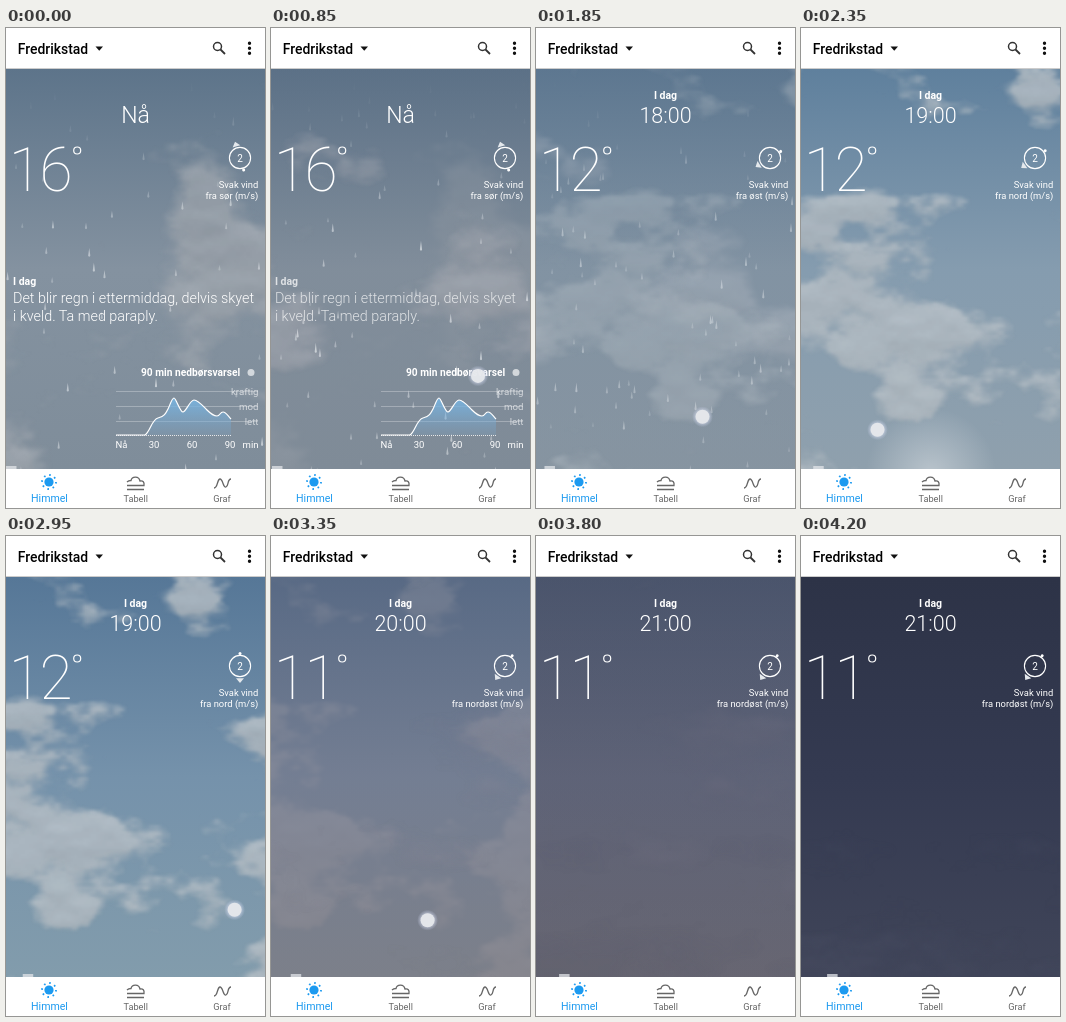
Write an HTML page with a canvas that moves like this. It is 259 px wide and 480 px high and loops after 5200 ms.

```html
<!DOCTYPE html>
<html lang="no">
<head>
<meta charset="utf-8">
<title>Værmelding</title>
<style>
  html, body { margin: 0; width: 100%; height: 100%; overflow: hidden; background: #fff; }
  canvas, svg { position: absolute; left: 0; top: 0; width: 259px; height: 480px; }
  svg { font-family: Roboto, sans-serif; fill: #fff; }
  .mid { text-anchor: middle; }
  .end { text-anchor: end; }
  .thin { font-weight: 100; }
  .light { font-weight: 300; }
  .bold { font-weight: 700; }
  .line { fill: none; stroke: #fff; }
</style>
</head>
<body>
<canvas id="sky" width="259" height="480"></canvas>
<svg viewBox="0 0 259 480">
  <defs>
    <linearGradient id="water" x1="0" y1="0" x2="0" y2="1">
      <stop offset="0" stop-color="#78b4e0" stop-opacity=".95"/>
      <stop offset="1" stop-color="#78a8d0" stop-opacity=".2"/>
    </linearGradient>
    <radialGradient id="halo">
      <stop offset=".6" stop-color="#dfe4f4" stop-opacity=".6"/>
      <stop offset="1" stop-color="#c3cbe8" stop-opacity="0"/>
    </radialGradient>
  </defs>

  <text id="day" class="mid bold" x="129.5" y="71" font-size="10.5">I dag</text>
  <text id="hour" class="mid light" x="129.5" y="94.5"></text>
  <text id="temp" class="thin" x="2.8" y="163" font-size="60.5" letter-spacing="-2.5"></text>
  <circle class="line" cx="71.2" cy="122.5" r="3.5" stroke-width="1.2"/>

  <g font-size="9.4">
    <circle class="line" cx="234" cy="130" r="10.6" stroke-width="1.1"/>
    <text id="speed" class="mid" x="234" y="133.6" font-size="10"></text>
    <g id="vane">
      <path d="M12.2 -4L17 0L12.2 4Z" fill="#e4e8ec"/>
      <circle cx="-12.5" r="1.5"/>
    </g>
    <text class="end" x="252.3" y="159.6">Svak vind</text>
    <text id="from" class="end" x="252.3" y="170.6"></text>
  </g>

  <g id="story">
    <text class="bold" x="7" y="256.5" font-size="10.5">I dag</text>
    <g class="light" font-size="14.35">
      <text x="7" y="274.5">Det blir regn i ettermiddag, delvis skyet</text>
      <text x="7" y="293">i kveld. Ta med paraply.</text>
    </g>
  </g>

  <g id="chart">
    <text class="bold" x="135" y="348" font-size="10.2">90 min nedbørsvarsel</text>
    <circle cx="245" cy="344.5" r="3.5" fill-opacity=".65"/>
    <path d="M110 363.5H252M110 378.5H252M110 393.5H252" class="line" stroke-opacity=".28"/>
    <path d="M110 407.5H225" class="line" stroke-opacity=".8" stroke-dasharray="1 1"/>
    <path id="fill" fill="url(#water)"/>
    <path id="curve" class="line" stroke-width="1.2"/>
    <g font-size="9.7" class="end" fill-opacity=".65">
      <text x="252.5" y="367">kraftig</text>
      <text x="252.5" y="382">mod</text>
      <text x="252.5" y="397">lett</text>
    </g>
    <g font-size="9.5" class="mid">
      <text x="115.5" y="420">Nå</text>
      <text x="148" y="420">30</text>
      <text x="186" y="420">60</text>
      <text x="224" y="420">90</text>
      <text x="244.5" y="420">min</text>
    </g>
  </g>

  <rect id="bar" y="438" width="10.5" height="3.5" fill="#e2e5e8" fill-opacity=".75"/>
  <g id="touch">
    <circle r="10.5" fill="url(#halo)"/>
    <circle r="7" fill="#e6e8ec" fill-opacity=".93"/>
  </g>

  <rect width="259" height="41"/>
  <path d="M0 40.5H259" stroke="#000" stroke-opacity=".2"/>
  <g>
    <text x="11.8" y="25.5" font-size="13.9" font-weight="500" fill="#000">Fredrikstad</text>
    <path d="M89.5 18.500H97L93.25 22.7Z" fill="#111"/>
    <circle cx="211.5" cy="18.5" r="4" fill="none" stroke="#333" stroke-width="1.5"/>
    <path d="M214.5 21.5L219 26" stroke="#333" stroke-width="1.8"/>
    <path d="M243.5 15.3v.01m0 5v.01m0 5v.01" stroke="#111" stroke-width="3.4" stroke-linecap="round"/>
  </g>

  <rect y="441" width="259" height="39"/>
  <g class="mid" font-size="9.2" fill="#666">
    <g fill="#1c9af0">
      <circle cx="43" cy="454" r="4.6"/>
      <circle cx="43" cy="454" r="7" fill="none" stroke="#1c9af0" stroke-width="1.8" stroke-dasharray="1.6 3.898"/>
      <text x="43.5" y="474" font-size="10.6">Himmel</text>
    </g>
    <path d="M121 461.5H138M121 457.500H138C138.500 454 137 452.500 134 453C133 448 126 448 125 452.500C123 452.500 122 453 121 454" fill="none" stroke="#666" stroke-width="1.3"/>
    <text x="129.7" y="474">Tabell</text>
    <path d="M208 460C212 460 211 451 214 451S217 460 220 459S221 451 225 451" fill="none" stroke="#666" stroke-width="1.3"/>
    <text x="216" y="474">Graf</text>
  </g>
</svg>
<script>
const $ = id => document.getElementById(id);
const set = (id, attrs) => Object.entries(attrs).forEach(([k, v]) => $(id).setAttribute(k, v));
const W = 259, TOP = 41, H = 400, PAD = 100, LOOP = 5200;
const ctx = $('sky').getContext('2d');
const clamp = (v, lo = 0, hi = 1) => Math.max(lo, Math.min(hi, v));
const mix = (a, b, u) => a + (b - a) * u;
const smooth = (a, b, v) => { v = clamp((v - a) / (b - a)); return v * v * (3 - 2 * v); };

function hash(x, y) {
  let n = Math.imul(x, 374761393) + Math.imul(y, 668265263);
  n = Math.imul(n ^ (n >>> 13), 1274126177);
  return ((n ^ (n >>> 16)) >>> 0) / 4294967296;
}

function noise(x, y) {
  const i = Math.floor(x), j = Math.floor(y);
  const u = smooth(0, 1, x - i), v = smooth(0, 1, y - j);
  return mix(mix(hash(i, j), hash(i + 1, j), u), mix(hash(i, j + 1), hash(i + 1, j + 1), u), v);
}

function fbm(x, y) {
  let sum = 0, amp = .5;
  for (let k = 0; k < 5; k++, amp /= 2, x *= 2.03, y *= 2.03) sum += amp * noise(x, y);
  return sum;
}

// A band of clouds around height cy, lit from above.
function clouds({ seed, rgb, alpha, cy, spread, edge }) {
  const c = document.createElement('canvas');
  c.width = (W + 2 * PAD) >> 1;
  c.height = H >> 1;
  const g = c.getContext('2d'), img = g.createImageData(c.width, c.height);
  for (let py = 0, k = 0; py < c.height; py++) {
    const y = py * 2 + TOP;
    const band = Math.exp(-(((y - cy) / spread) ** 2));
    for (let px = 0; px < c.width; px++, k += 4) {
      const u = px / 50 + seed, v = y / 62 + seed;
      const n = fbm(u, v);
      const light = (n - fbm(u, v - .15)) * 70;
      rgb.forEach((base, q) => img.data[k + q] = base + light);
      img.data[k + 3] = 255 * alpha * smooth(0, edge, n + .27 * band - .64);
    }
  }
  g.putImageData(img, 0, 0);
  return c;
}

const rain = clouds({ seed: 3, rgb: [160, 166, 173], alpha: .7, cy: 270, spread: 120, edge: .2 });
const storm = clouds({ seed: 8, rgb: [164, 167, 175], alpha: .8, cy: 285, spread: 95, edge: .2 });
const fair = clouds({ seed: 13, rgb: [175, 184, 191], alpha: .85, cy: 270, spread: 85, edge: .12 });
const dusk = clouds({ seed: 21, rgb: [135, 130, 144], alpha: .25, cy: 300, spread: 110, edge: .3 });
const night = clouds({ seed: 27, rgb: [68, 73, 94], alpha: .3, cy: 400, spread: 90, edge: .3 });

function scene(at, colors, layer) {
  const sky = ctx.createLinearGradient(0, TOP, 0, TOP + H);
  colors.forEach((c, i) => sky.addColorStop(i / 2, c));
  return { at, sky, layer };
}

const scenes = [
  scene(0, ['#5d748a', '#8492a0', '#7f8d9a'], rain),
  scene(1400, ['#5b6f85', '#7f8b98', '#7f8a96'], storm),
  scene(2350, ['#5f809d', '#859caf', '#8fa0ad'], fair),
  scene(2950, ['#567797', '#7592ab', '#829cac'], fair),
  scene(3550, ['#59657e', '#73778a', '#7a767e'], dusk),
  scene(4200, ['#2d3347', '#343a51', '#404559'], night)
];

function drawScene(s, t, alpha) {
  ctx.globalAlpha = alpha;
  ctx.fillStyle = s.sky;
  ctx.fillRect(0, TOP, W, H);
  const drift = clamp((2600 - t) * .08, -PAD, PAD);
  ctx.drawImage(s.layer, drift - PAD, TOP, W + 2 * PAD, H);
}

const glow = ctx.createRadialGradient(130, 445, 4, 130, 445, 65);
glow.addColorStop(0, '#fff');
glow.addColorStop(1, '#fff0');

function drawSky(t) {
  const next = Math.max(1, scenes.findIndex(s => s.at >= t));
  const [a, b] = scenes.slice(next - 1);
  drawScene(a, t, 1);
  drawScene(b, t, smooth(a.at, b.at, t));
  ctx.globalAlpha = .35 * clamp(1 - Math.abs(t - 2350) / 400);
  ctx.fillStyle = glow;
  ctx.fillRect(0, 375, W, 70);
}

function drawRain(t) {
  const wet = 1 - smooth(1650, 2200, t);
  const count = mix(50, 85, clamp(t / 1400));
  ctx.fillStyle = '#edf0f3';
  for (let i = 0; wet && i < count; i++) {
    const near = hash(i, 9);
    const x = hash(i, 4) * W;
    const y = TOP + (hash(i, 7) * 420 + t * (.2 + near * .14)) % 420 - 10;
    ctx.globalAlpha = wet * (.2 + near * .45) * smooth(TOP, 220, y);
    ctx.beginPath();
    ctx.moveTo(x, y - 4 - near * 5);
    ctx.lineTo(x + 1.1, y);
    ctx.arc(x, y, 1.1, 0, Math.PI);
    ctx.fill();
  }
}

const hours = [
  { label: 'Nå', temp: 16, speed: 2, from: 'sør', angle: -107 },
  { label: '17:00', temp: 12, speed: 3, from: 'sørøst', angle: -154 },
  { label: '18:00', temp: 12, speed: 2, from: 'øst', angle: -212 },
  { label: '19:00', temp: 12, speed: 2, from: 'nord', angle: -270 },
  { label: '20:00', temp: 11, speed: 2, from: 'nordøst', angle: -235 },
  { label: '21:00', temp: 11, speed: 2, from: 'nordøst', angle: -235 }
];

// Every swipe moves left at the same speed.
const swipes = [{ at: 700, y: 344 }, { at: 1475, y: 379 }, { at: 2920, y: 373 }];

const curve = 'M110 407H139C144 404 146 391 152 390S160 385 162 381S166 370 168 370S174 384 177 384S184 372 188 372S197 378 201 382S208 388 211 388S214 384 217 384S222 388 225 391';
set('curve', { d: curve });
set('fill', { d: curve + 'V407Z' });

function drawLabels(t) {
  const pos = clamp((t - 340) / 660, 0, 5), i = Math.floor(pos);
  const h = hours[i], before = hours[Math.max(0, i - 1)];
  const angle = mix(before.angle, h.angle, smooth(0, .3, pos - i + (i === 5)));
  $('hour').textContent = h.label;
  $('temp').textContent = h.temp;
  $('speed').textContent = h.speed;
  $('from').textContent = `fra ${h.from} (m/s)`;
  set('day', { opacity: i ? 1 : 0 });
  set('hour', { 'font-size': i ? 21.5 : 23 });
  set('vane', { transform: `translate(234 130) rotate(${angle})` });

  const away = smooth(700, 1150, t);
  set('story', { opacity: 1 - away, transform: `translate(${-12 * away})` });
  set('chart', { opacity: 1 - smooth(1450, 1850, t) });
  set('bar', { x: Math.max(0, t - 720) * .0075 });

  const swipe = swipes.filter(s => t >= s.at).pop();
  const dt = swipe ? t - swipe.at : LOOP;
  set('touch', { opacity: dt <= 875 ? 1 : 0 });
  if (swipe) set('touch', { transform: `translate(${234 - .18 * dt} ${swipe.y + .026 * dt})` });
}

// The picture advances in uneven steps.
function step(t) {
  if (t < 300) return 0;
  if (t < 2550) return Math.min(2450, Math.floor(t / 50) * 50);
  if (t < 3800) return Math.min(3650, Math.floor((t - 50) / 100) * 100 + 50);
  return Math.min(4200, Math.floor(t / 200) * 200);
}

let last = -1;
function frame() {
  const t = step(performance.now() % LOOP);
  if (t !== last) {
    drawSky(t);
    drawRain(t);
    drawLabels(t);
    last = t;
  }
  requestAnimationFrame(frame);
}
frame();
</script>
</body>
</html>
```
